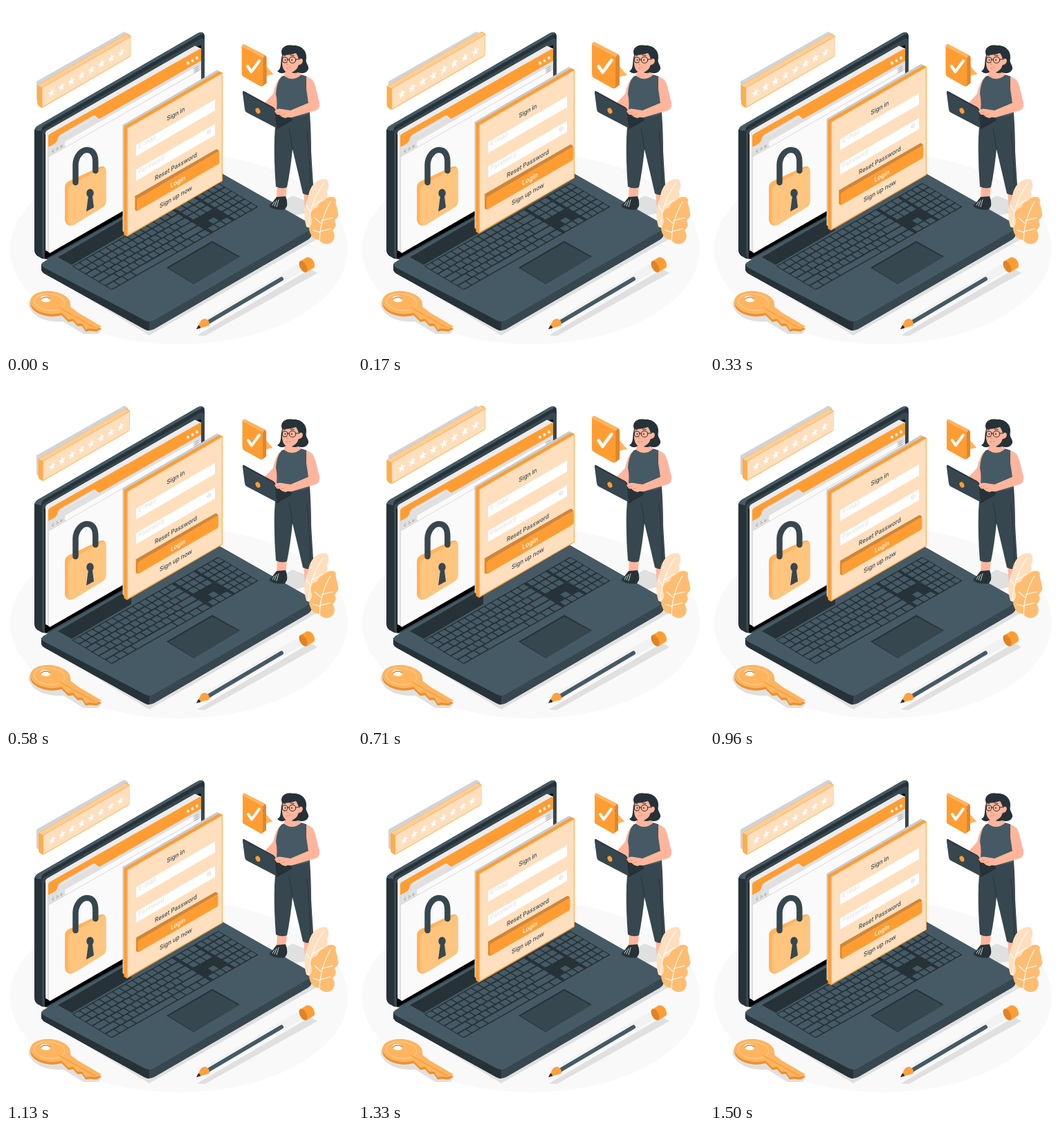
Recreate the animation shown at these times as an HTML page. Size 500 px wide and 500 px high, loop 1.54 s.

```html
<!DOCTYPE html>
<html lang="en">
<head>
<meta charset="utf-8">
<title>Sign in</title>
<style>
html, body { margin: 0; width: 100%; height: 100%; overflow: hidden; background: #fff; }
svg { display: block; width: 100%; height: 100%; }
text { font: 500 9.2px Inter, "Open Sans", sans-serif; fill: #37474f; }
.mid { text-anchor: middle; }
.hint { font-weight: 400; fill: #dedede; }
.line { fill: none; stroke-linecap: round; stroke-linejoin: round; }
</style>
</head>
<body>
<svg viewBox="0 0 500 500">
  <ellipse cx="250" cy="351" rx="244" ry="138" fill="#f9f9f9"/>

  <g id="ground-shadows" fill="#e0e0e0">
    <path d="M54 384L207 476L449 337L440 322Z"/>
    <path d="M276 476L287 477L450 386L440 380Z"/>
    <path d="M384 292L414 274L440 284V298L408 304Z"/>
  </g>

  <g id="password">
    <path d="M44 109L171 37L176 40V66L49 139L44 136Z" fill="#d3d3d3"/>
    <g id="passwordBox">
      <path d="M47 114L172 42Q174 41 176 42.500L178.500 44.500V71Q178.500 73 177 74L55 145Q53 146 51 144.500L48 142Q47 141 47 139Z" fill="#ffad4c"/>
      <path d="M47.500 114L172 42.300L178 45L53.500 117Z" fill="#ffcd95"/>
      <path d="M54 117.500L178 46V72.500L54 144.500Z" fill="#ffdfbd"/>
      <g id="stars" class="line" stroke="#fff" stroke-width="2.200"/>
    </g>
  </g>

  <g id="screen">
    <path d="M41 181Q41 176 46 173L276 40Q283 36 286 40Q287 41 287 46V252L60 366L52 365L45 361Q41 358 41 352Z" fill="#263238"/>
    <path d="M41.500 179Q42 175.500 46 173L276 40Q282 36.500 285.500 39.500L281 41.500L56 172Q51 175 51 181Z" fill="#455a64"/>
    <path d="M52 185Q52 180 57 177L278 49Q287 44 287 52V252L60 366Q52 366 52 358Z" fill="#37474f"/>
    <path d="M56 186L280 57Q282 56 282 59V240L58 365Q56 365 56 361Z" fill="#000"/>
  </g>

  <g id="browser">
    <path d="M57 184Q57 181.500 59 180L273 57.500L282 61.500V231L64 356.500L57 353Z" fill="#ececec"/>
    <path d="M61 188L282 62V231L64 356.500Q61 357 61 354Z" fill="#fafafa"/>
    <path d="M61 205L282 79V92L61 219Z" fill="#dcdcdc"/>
    <path d="M61 189Q61 186 64 184.500L279 62.500Q282 61 282 64V79.500L61 206Z" fill="#ff9d33"/>
    <path d="M61 204L70 199Q74 196 75 191Q76 187 80 185L125 159Q129 157 131 161L135 163L282 79V92L61 218Z" fill="#e0e0e0"/>
    <path d="M80 188L126 162M130 160L132.500 163" class="line" stroke="#f3f3f3"/>
    <path d="M87 195L269 91Q271 90 271 93V97L87 203Q85 203 85 200Q85 196 87 195Z" fill="#fafafa"/>
    <path d="M69 207L66.500 210.500L69 211M73 205L75.500 205.500L73 208.500M80 201L79 205L82 202M273 90L278 87M273 93L278 90M273 96L278 93" class="line" stroke="#a6a6a6" stroke-width="1"/>
    <path d="M61.500 205V355L64 356.500" class="line" stroke="#d6d6d6" stroke-width="1"/>
    <g fill="#fff"><ellipse cx="263" cy="82.500" rx="1.900" ry="2.300"/><ellipse cx="269.500" cy="79" rx="1.900" ry="2.300"/><ellipse cx="276" cy="75" rx="1.900" ry="2.300"/></g>
  </g>

  <g id="lock">
    <path d="M85 262Q85 256 91 253L135 232.500Q143 230 144.500 237V282Q144 288 139 291L100 315Q93 319.500 88 315.500Q85 313 85 308Z" fill="#ffb45e"/>
    <path d="M90 267Q90 261 95 258L138 234.500Q144.500 232 144.500 240V282Q144.500 288 139 291L99 315.500Q90 320 90 311Z" fill="#ffc47e"/>
    <path d="M100.500 255V229C101 217 109 208 117 208C125 208 129.300 214 129.300 226V238" class="line" stroke="#37474f" stroke-width="8.500"/>
    <ellipse cx="121.500" cy="270.500" rx="5.200" ry="6.200" fill="#37474f"/>
    <path d="M119 274L124.500 272L127 291L116 297Z" fill="#37474f"/>
  </g>

  <g id="laptop">
    <path d="M51 373V380Q51 384 56 387L200 467Q207 470.500 214 467L436 338Q442 334 442 329V320Z" fill="#37474f"/>
    <path d="M51 373V380Q51 384 56 387L200 467Q204 469.500 207 469V456Z" fill="#263238"/>
    <path d="M54 370L62 365L290 237Q298 233 306 238.500L437 313Q446 319 437 325L214 454Q207 458 200 454L55 378Q48 374 54 370Z" fill="#455a64"/>
    <path d="M75 363L95 374L181 324V301Z" fill="#263238"/>
    <g id="keyboard" transform="matrix(9.590 -5.450 9.500 5.670 95 376)">
      <rect width="22.100" height="6.100" rx=".15" fill="#263238"/>
    </g>
    <path d="M232 378L298 339.500L338 362L271 402Z" fill="#263238"/>
    <path d="M235 378.500L298 342L337 363L271 401.500Z" fill="#37474f"/>
  </g>

  <g id="panel">
    <path d="M168.500 173L305 93.500L311 97V250L172 330L168.500 326Z" fill="#c9c9c9"/>
    <path d="M170.500 175L308.500 95.500L312.800 97.500V254L175 334.300L170.500 331.500Z" fill="#ff9d33"/>
    <path d="M175.500 177.500L312 98.500V253.500L175.500 332.300Z" fill="#ffdfbd"/>
    <path d="M175.300 177.300L312.400 98V253.700L175.300 333Z" class="line" stroke="#ffa949" stroke-width=".9"/>
    <path d="M188 202L302 136V152L188 218ZM188 237.500L302 171.500V187.500L188 253.500Z" fill="#fff"/>
    <path d="M291 185Q291 179 296 180.500Q296 187 291 185Z" class="line" stroke="#dadada" stroke-width=".9"/>
    <circle cx="293.500" cy="183" r="1" fill="#dadada"/>
    <g id="panelText"></g>
    <g id="button">
      <path d="M187.500 275.500L302 209.500Q304 208.500 306 211.500V229L192 295.500Q190 296.500 188 294.500V277Z" fill="#df882b"/>
      <path d="M188 275.500L302 209.800L306 212L192 278Z" fill="#cc8740"/>
      <path d="M193 278L304 213Q306.500 212 306.500 215V227Q306.500 229.500 304 231L193 295Q190.500 296 190.500 293V282Q190.500 279.500 193 278Z" fill="#ff9d33"/>
    </g>
  </g>

  <g id="key">
    <path d="M33 434C30 414 76 403 93 426L94 442L138 467L134 474L112 474L83 456Q43 458 33 434Z" fill="#e0e0e0"/>
    <g id="keyShape">
      <ellipse cx="64" cy="428.500" rx="29" ry="16.500" transform="rotate(6 64 428.500)"/>
      <path d="M80 443L91 433L104 443L138 463L131 467L121 466L115 467L110 459L103 459L97 452L90 453Z"/>
    </g>
    <ellipse cx="63" cy="428" rx="22" ry="12" class="line" stroke="#ffd29c" transform="rotate(6 63 428)"/>
    <ellipse cx="57" cy="423.500" rx="7.500" ry="4.500" fill="#fff" transform="rotate(8 57 423.500)"/>
    <path d="M50 424Q56 418 64 423" class="line" stroke="#dc842a" stroke-width="1.500"/>
    <path d="M77 436L129 465" class="line" stroke="#ed902e"/>
  </g>

  <g id="pencil">
    <path d="M288 451L421 373L427 384L295 460Z" fill="#f2f2f2"/>
    <path d="M292 457L398 394.500" class="line" stroke="#455a64" stroke-width="6"/>
    <path d="M275 467L282 454Q287 450 292 454Q295 458 293 462Z" fill="#ffa13c"/>
    <path d="M275 467L278 461.500Q281 462 281 465.500Z" fill="#263238"/>
    <path d="M425 369L435 363Q442 363 445 370Q447 376 445 378L434 385Q427 384 424 376Q423 371 425 369Z" fill="#ff9d33"/>
    <ellipse cx="429.500" cy="376.500" rx="4.800" ry="9" transform="rotate(-28 429.500 376.500)" fill="#dd842a"/>
  </g>

  <g id="woman">
    <path d="M392 259L406 260L404 280L391 280Z" fill="#ffb59b"/>
    <path d="M430 268L444 270L443 296L432 292Z" fill="#ffb59b"/>
    <path d="M391 276L404 275Q407 282 406 289L403 294Q390 296 381 290Q380 287 384 285Z" fill="#263238"/>
    <path d="M385 288L388 283M388 289L391 281M391 290L394 280" class="line" stroke="#fff" stroke-width=".8"/>
    <path d="M390 158L439 154Q441 184 441 210Q443 246 445 272Q437 275 429 271Q422 240 414 207Q411 238 406 262Q398 265 390 261Q387 225 388 190Z" fill="#37474f"/>
    <path d="M414 207Q412 190 409 177M435 180Q439 220 440 268" class="line" stroke="#263238" stroke-width=".9"/>
    <path d="M396 104Q390 109 386 127L374 140L389 154L401 128Z" fill="#ffb59b"/>
    <path d="M398 102Q416 94 435 102Q439 107 438 120Q435 133 439 156Q416 163 390 161Q393 139 390 127Q391 110 398 102Z" fill="#455a64"/>
    <path d="M434 102Q444 104 447 116L453 140Q454 149 447 151L413 161L399 161L391 154Q395 149 401 150L411 151L437 140L434 120Z" fill="#ffb59b"/>
    <path d="M403 90L423 91L426 100Q414 110 402 101Z" fill="#ffb59b"/>
    <path d="M399 71C395 61 404 55 414 57C426 56 435 64 434 75C432 83 438 85 437 91C434 98 427 98 422 96C414 99 410 94 406 93C402 99 396 98 392 94C399 91 396 80 399 71Z" fill="#263238"/>
    <path d="M400 71Q411 71 419 68Q422 72 423 77Q428 74 429 79Q428 85 423 85Q420 95 409 97Q399 95 399 81Z" fill="#ffb59b"/>
    <g class="line" stroke="#263238" stroke-width="1.100">
      <ellipse cx="403" cy="78" rx="3.800" ry="4"/><ellipse cx="414" cy="78" rx="4.700" ry="4.500"/>
      <path d="M406.500 77L409 77M418.500 77L424 77M401 72L404 71M411 71L416 71.500"/>
    </g>
    <circle cx="403.500" cy="78" r="1" fill="#263238"/><circle cx="413" cy="78" r="1" fill="#263238"/>
    <path d="M407 79L405.500 84L408 85" class="line" stroke="#ea846c" stroke-width=".9"/>
    <path d="M405 89Q408 91 411 88Q410 92 407 91Z" fill="#fff" stroke="#c95d4d" stroke-width=".5"/>
    <path d="M344 123L386 146Q389 148 389 151L392 177L348 154Q345 152 345 149L342 126Q342 122 344 123Z" fill="#37474f"/>
    <path d="M389 151L392 178L413 166V163L398 156Z" fill="#263238"/>
    <path d="M343 124L386 147Q389 149 389 152L392 177" class="line" stroke="#263238" stroke-width="1.400"/>
    <ellipse cx="364" cy="151.500" rx="3.200" ry="4.300" transform="rotate(-25 364 151.500)" fill="#ff9d33"/>
    <path d="M388 152Q392 147 399 149L411 151L414 158L404 162Q398 161 395 157Q391 158 390 155Z" fill="#ffb59b"/>
    <path d="M391 155L397 153M397 158L403 156" class="line" stroke="#ea846c" stroke-width=".7"/>
  </g>

  <g id="bubble">
    <path d="M374 85L385.500 98Q379 98.500 374 101Z" fill="#ffb45e"/>
    <path d="M342 60Q342 57 345 57L374 72Q376 73 376 76V110L371 114Q369 115 367 114L344 101Q342 100 342 97Z" fill="#e0862b"/>
    <path d="M342 60Q342 57 345 57L374 72L371 76L343 61Z" fill="#ffb45e"/>
    <path d="M342 60L369 74.500Q371 76 371 78V112Q371 115 368 114L344 101Q342 100 342 97Z" fill="#ff9d33"/>
    <path d="M350 87L355 94.500L366 79.500" class="line" stroke="#fff" stroke-width="4"/>
  </g>

  <g id="plant">
    <path d="M434 319C429 301 432 286 437 276C438 262 448 250 460 250C468 250 467 263 464 268C467 278 458 283 457 289C461 302 450 313 443 323Z" fill="#ffdfbd"/>
    <path d="M437 318Q440 282 459 256M439 296L434 288M441 290L457 280" class="line" stroke="#fff" stroke-width="1.100"/>
    <path d="M438 322C441 316 444 312 441 306C438 297 445 292 450 291C453 282 458 283 462 279C467 274 477 275 477 281C475 287 480 290 479 297C483 304 476 307 475 311C479 317 475 321 472 324C477 331 475 340 468 343C460 346 455 341 452 338C445 338 439 331 438 322Z" fill="#ffbd72"/>
    <path d="M453 339Q454 308 469 283M455 314L446 306M456 310L472 306M453 327L444 324M453 326L469 322" class="line" stroke="#fff" stroke-width="1.100"/>
  </g>
</svg>

<script>
const byId = id => document.getElementById(id);
const add = (parent, html) => parent.insertAdjacentHTML('beforeend', html);

// Text lying on the upright isometric plane
const label = (parent, text, x, y, cls = 'mid', size = 9.2) => add(parent,
  `<text class="${cls}" transform="matrix(.866 -.5 0 1 ${x} ${y})" style="font-size:${size}px">${text}</text>`);

const panelText = byId('panelText'), button = byId('button');
label(panelText, 'Sign in', 245.5, 160);
label(panelText, 'E-mail', 191.5, 208, 'hint', 9.6);
label(panelText, 'Password', 191.5, 244, 'hint', 9.2);
label(panelText, 'Reset Password', 245.5, 236);
label(panelText, 'Sign up now', 245.5, 280);
label(button, 'Login', 248.5, 258);
button.lastElementChild.style.fill = '#fff';

for (let i = 0; i < 8; i++) add(byId('stars'),
  `<path transform="matrix(.866 -.5 0 1 ${67 + i * 14.05} ${124.5 - i * 8.1})" d="M0-4V0L3.800-1.200M0 0L2.400 3.300M0 0L-2.400 3.300M0 0L-3.800-1.200"/>`);

// The key is one flat shape stacked to give it thickness
const keyShape = byId('keyShape');
keyShape.setAttribute('fill', '#ffb45e');
const keySide = keyShape.cloneNode(true);
keySide.id = 'keySide';
keySide.setAttribute('fill', '#ed902e');
keySide.setAttribute('transform', 'translate(0 3.5)');
keyShape.before(keySide);

// Keyboard: main block, navigation keys, number pad
const ones = (n, width = 1) => Array(n).fill(width);
const rows = [
  ones(15), [...ones(13), 2], [1.5, ...ones(12), 1.5],
  [1.75, ...ones(11), 2.25], [2.25, ...ones(10), 2.75],
  [...ones(3, 1.25), 6.25, ...ones(4, 1.25)]
];
function drawKeys(x, row, widths) {
  for (const w of widths) {
    add(byId('keyboard'), `<rect x="${x + .12}" y="${row + .14}" width="${w - .16}" height=".8" rx=".1" fill="#455a64"/>`);
    x += w;
  }
}
rows.forEach((widths, row) => {
  drawKeys(0, row, widths);
  if (row < 3 || row === 5) drawKeys(15.3, row, ones(3));
  if (row === 4) drawKeys(16.3, row, [1]);
  drawKeys(18.55, row, ones(4, .87));
});

const LOOP = 1540, FRAMES = 37, STEP = 1000 / 24;
const heartbeat = p => Math.max(0,
  p < .1 ? p / .1 : (.3 - p) / .2,
  1 - Math.abs(p - .5) / .1);
const scaleAbout = (id, x, y, s) =>
  byId(id).setAttribute('transform', `translate(${x} ${y}) scale(${s}) translate(${-x} ${-y})`);

let start;
function draw(now) {
  start ??= now;
  const frame = Math.min(FRAMES - 1, Math.floor((now - start) % LOOP / STEP + .2));
  const p = (frame + 1) % FRAMES / FRAMES;
  const beat = heartbeat(p);
  const lift = 20 * (1 - Math.abs(1 - 2 * p));
  byId('panel').setAttribute('transform', `translate(0 ${-lift})`);
  scaleAbout('button', 247, 253, 1 + .1 * beat);
  scaleAbout('passwordBox', 112.7, 93.5, 1 + .1 * beat);
  scaleAbout('bubble', 364, 86, 1 + .2 * beat);
  requestAnimationFrame(draw);
}
requestAnimationFrame(draw);
</script>
</body>
</html>
```
